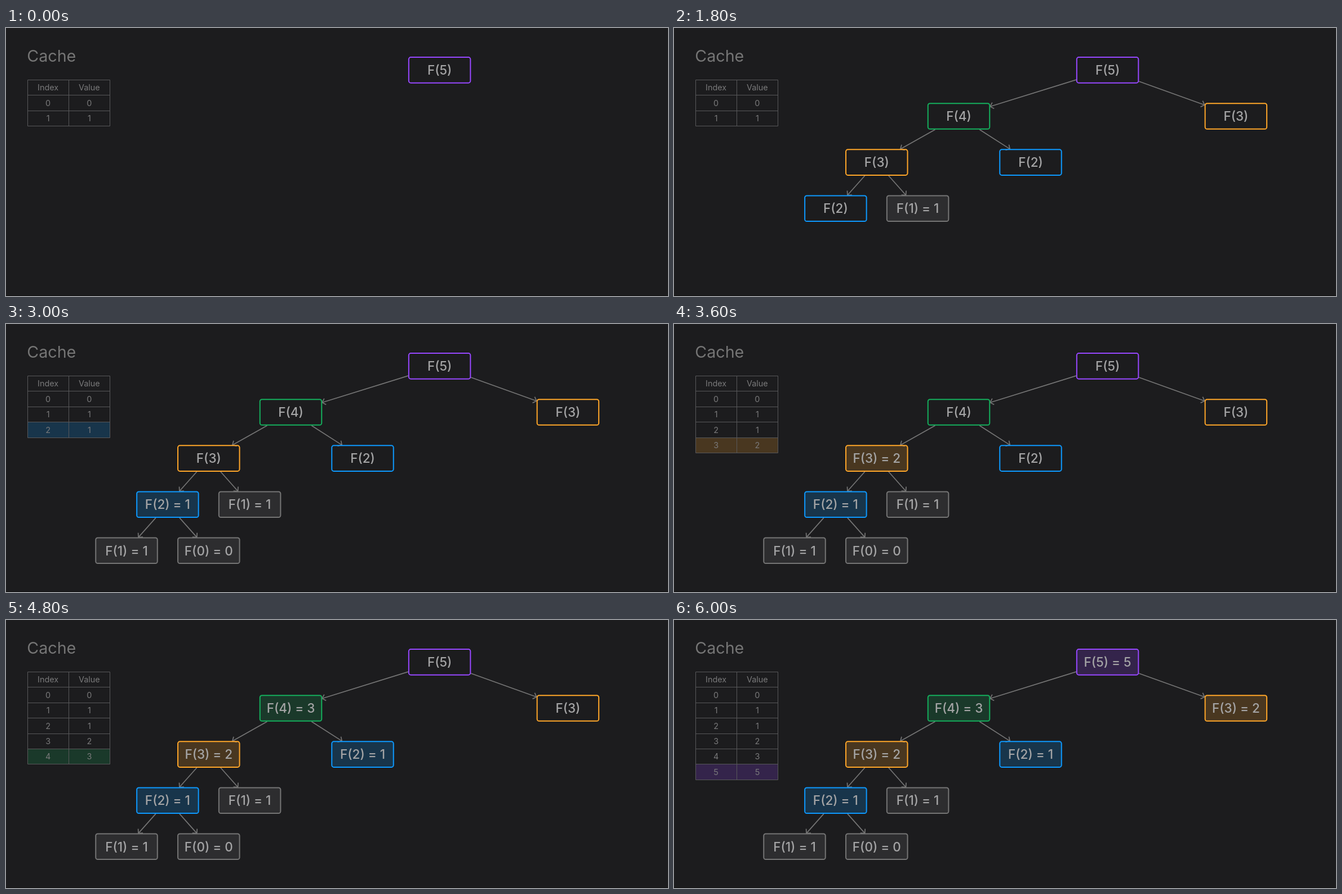
An HTML page with a canvas for the animation above (6600 ms loop, 1175 px wide and 477 px high).

```html
<!DOCTYPE html>
<html lang="en">
<head>
<meta charset="utf-8">
<title>Fibonacci with a cache</title>
<style>
  html, body { margin: 0; width: 100%; height: 100%; overflow: hidden; background: #1c1c1e; }
  canvas { display: block; }
</style>
</head>
<body>
<canvas id="stage" width="1175" height="477"></canvas>
<script>
const ctx = document.getElementById('stage').getContext('2d');
const STEP = 600, STEPS = 11;
const HALF_W = 55.6, HALF_H = 23.7;
const BG = '#1c1c1e', GRAY = '#757575';
const FONT = 'Inter, "Liberation Sans", sans-serif';
const FIB = [0, 1, 1, 2, 3, 5];
const COLORS = [GRAY, GRAY, '#0d99ff', '#ffa629', '#14ae5c', '#9747ff'];

// n, centre x, tree level, parent, step shown, step solved
const nodes = [
  [5, 769.6, 0, -1, 0, 10],
  [4, 505.5, 1, 0, 1, 8],
  [3, 997.4, 1, 0, 1, 9],
  [3, 359.8, 2, 1, 2, 6],
  [2, 633, 2, 1, 2, 7],
  [2, 286.9, 3, 3, 3, 5],
  [1, 432.6, 3, 3, 3, 3],
  [1, 214, 4, 5, 4, 4],
  [0, 359.8, 4, 5, 4, 4]
].map(([n, x, level, parent, shown, solved]) =>
  ({ n, x, y: 74.9 + 82.1 * level, parent, shown, solved }));

// Step at which each cache row is added
const rowStep = [0, 0, 5, 6, 8, 10];

function label(text, x, y, size, color, weight = 400, align = 'center') {
  ctx.font = `${weight} ${size}px ${FONT}`;
  ctx.textAlign = align;
  ctx.fillStyle = color;
  ctx.fillText(text, x, y);
}

function tint(color, draw) {
  ctx.globalAlpha = 0.2;
  ctx.fillStyle = color;
  draw();
  ctx.globalAlpha = 1;
}

function line(...points) {
  ctx.beginPath();
  points.forEach(([x, y]) => ctx.lineTo(x, y));
  ctx.stroke();
}

function drawArrow(a, b) {
  const dx = b.x - a.x, dy = b.y - a.y;
  const k = Math.min(HALF_W / Math.abs(dx), HALF_H / Math.abs(dy));
  const tip = [b.x - dx * k, b.y - dy * k];
  const back = Math.atan2(-dy, -dx);
  const wing = turn => [tip[0] + 8 * Math.cos(back + turn), tip[1] + 8 * Math.sin(back + turn)];
  ctx.strokeStyle = GRAY;
  ctx.lineWidth = 1.7;
  line([a.x + dx * k, a.y + dy * k], tip);
  line(wing(-Math.PI / 4), tip, wing(Math.PI / 4));
}

function drawNode({ n, x, y, solved }, step) {
  const done = step >= solved;
  ctx.beginPath();
  ctx.roundRect(x - 54.75, y - 22.8, 109.5, 45.6, 3.6);
  if (done) tint(COLORS[n], () => ctx.fill());
  ctx.strokeStyle = COLORS[n];
  ctx.lineWidth = 2;
  ctx.stroke();
  label(`F(${n})` + (done ? ` = ${FIB[n]}` : ''), x, y + 8.2, 22.5, '#a4a4a5', 500);
}

function drawCache(step) {
  label('Cache', 37.2, 59.5, 28.7, GRAY, 400, 'left');
  const left = 38.5, mid = 111.5, right = 184.5, top = 92.5, rowH = 27.4;
  const cells = [['Index', 'Value']];
  rowStep.forEach((s, i) => { if (step >= s) cells.push([i, FIB[i]]); });

  const fresh = rowStep.indexOf(step);
  if (fresh > 1) tint(COLORS[fresh], () =>
    ctx.fillRect(left, top + rowH * (fresh + 1), right - left, rowH));

  ctx.strokeStyle = '#58585a';
  ctx.lineWidth = 1;
  const bottom = Math.floor(top + rowH * cells.length) + 0.5;
  for (const x of [left, mid, right]) line([x, top], [x, bottom]);
  for (let i = 0; i <= cells.length; i++) {
    const y = Math.floor(top + rowH * i) + 0.5;
    line([left, y], [right, y]);
  }
  cells.forEach(([index, value], i) => {
    const y = top + rowH * (i + 0.5) + 5.1;
    label(index, 74.6, y, 14.4, '#7a7a7b');
    label(value, 147.9, y, 14.4, '#7a7a7b');
  });
}

function draw(step) {
  ctx.fillStyle = BG;
  ctx.fillRect(0, 0, 1175, 477);
  ctx.fillStyle = '#111112';
  ctx.fillRect(0, 476, 1175, 1);
  drawCache(step);
  const visible = nodes.filter(node => step >= node.shown);
  visible.forEach(node => { if (node.parent >= 0) drawArrow(nodes[node.parent], node); });
  visible.forEach(node => drawNode(node, step));
}

const start = performance.now();
function frame() {
  const elapsed = performance.now() - start;
  draw(Math.floor(elapsed / STEP) % STEPS);
  requestAnimationFrame(frame);
}
frame();
</script>
</body>
</html>
```
